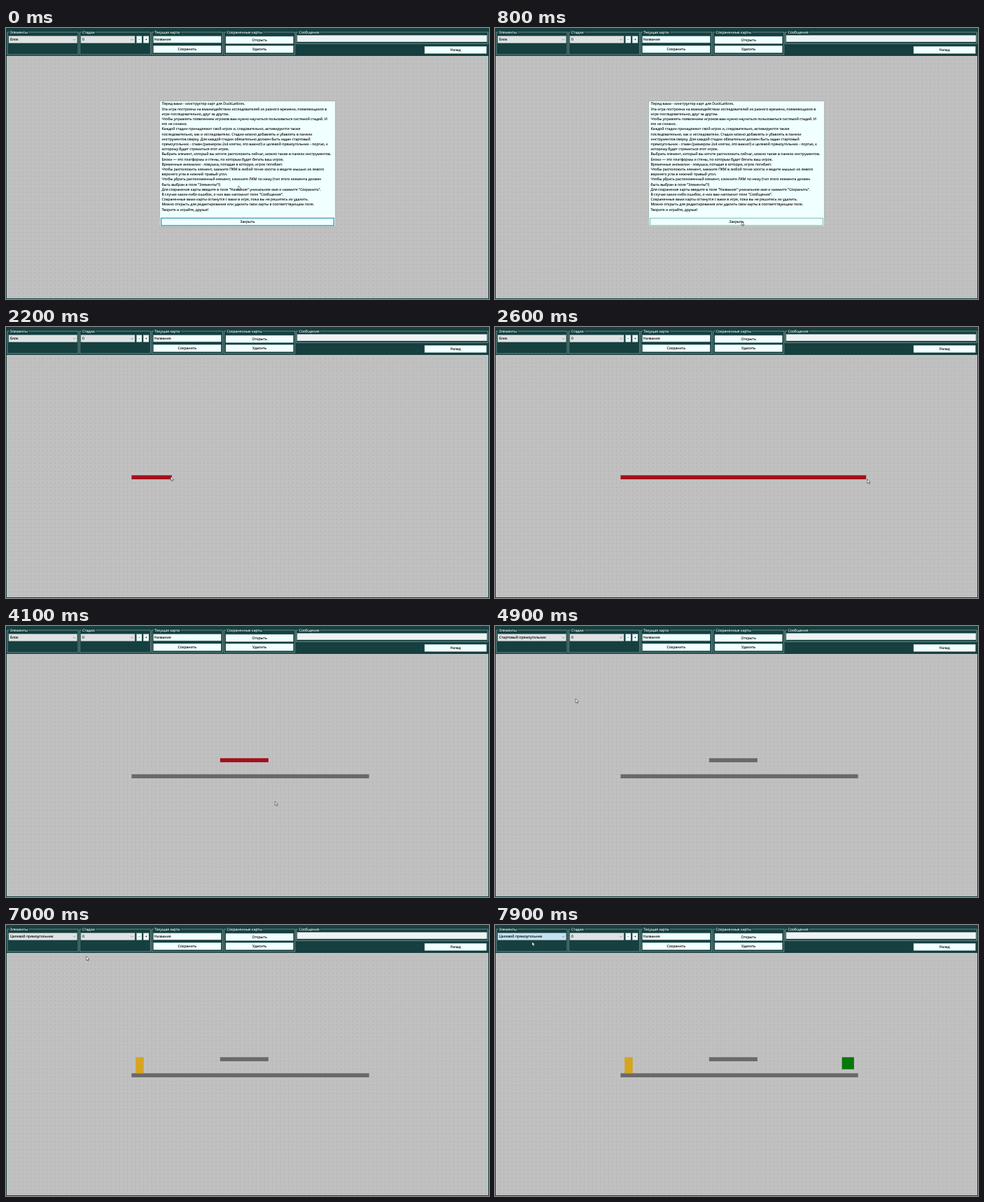
An HTML page for the animation above (8000 ms loop, 690 px wide and 388 px high).

```html
<!DOCTYPE html>
<html lang="ru">
<head>
<meta charset="utf-8">
<title>Конструктор карт</title>
<style>
html, body { margin: 0; width: 100%; height: 100%; overflow: hidden; background: #163f3f; }
svg { display: block; width: 690px; height: 388px; }
text { font: 5.1px "Open Sans", "Noto Sans", sans-serif; fill: #000; stroke: #000; stroke-width: 0.1px; text-rendering: geometricPrecision; white-space: pre; }
.mid { text-anchor: middle; }
.title { fill: #eef5f5; stroke: #eef5f5; }
</style>
</head>
<body>
<svg id="stage" viewBox="0 0 690 388"></svg>
<script>
const NS = "http://www.w3.org/2000/svg";
const stage = document.getElementById("stage");
const LOOP = 8000, STEP = 100;
const CELL = 5.75, X0 = 1.15, Y0 = 39.8;
const TEAL = "#163f3f", AZURE = "#f0ffff", RED = "#a3101a", GREY = "#696969", EDGE = "#93adad";

function add(tag, attrs, parent = stage) {
  const el = document.createElementNS(NS, tag);
  for (const k in attrs) el.setAttribute(k, attrs[k]);
  parent.appendChild(el);
  return el;
}
function box(x, y, w, h, fill, stroke = "none", sw = 0.5, parent = stage) {
  return add("rect", { x, y, width: w, height: h, fill, stroke, "stroke-width": sw }, parent);
}
// y is the middle of the line
function label(s, x, y, cls = "", parent = stage) {
  const el = add("text", { x, y: y + 1.8, class: cls }, parent);
  el.textContent = s;
  return el;
}
function button(s, x, y, w, h = 10.3, parent = stage) {
  const el = box(x, y, w, h, AZURE, EDGE, 0.4, parent);
  label(s, x + w / 2, y + h / 2, "mid", parent);
  return el;
}
function group(s, x, w, h = 32) {
  box(x, 6, w, h, "none", "#a9bcbc", 0.6);
  const gap = box(x + 2.6, 4, 0, 4, TEAL);
  gap.setAttribute("width", label(s, x + 3.8, 6, "title").getComputedTextLength() + 2.4);
}
function combo(s, x, w) {
  const face = box(x, 11.5, w, 10, "#dfe3e3", "#acb4b4");
  const text = label(s, x + 2, 16.5);
  add("path", { d: `M${x + w - 5.6} 15.8l1.6 1.6l1.6 -1.6`, fill: "none", stroke: "#5a6262", "stroke-width": 0.6 });
  return { face, text };
}

// canvas with its dotted grid
box(1, 40, 688, 347, "#c0c0c0");
let rows = "";
for (let y = Y0 + CELL; y < 387; y += CELL) rows += `M${X0 + CELL - 0.27} ${y.toFixed(2)}H688.5`;
add("path", { d: rows, stroke: "#5c5c5c", "stroke-width": 0.54, "stroke-dasharray": `0.54 ${CELL - 0.54}`, fill: "none" });

// toolbar: four equal groups and a wide one
["Элементы", "Стадии", "Текущая карта", "Сохраненные карты"].forEach((s, i) => group(s, 2 + i * 103.25, 101.1));
group("Сообщения", 414.7, 273.9, 16.3);
const kind = combo("Блок", 4, 97.5);
combo("0", 107, 77);
button("-", 186.5, 11.6, 7.5, 9.8);
button("+", 196.2, 11.6, 7.8, 9.8);
box(210.7, 11.7, 96.5, 9.4, AZURE, EDGE, 0.4);
label("Название", 211.8, 16.5);
button("Сохранить", 210.7, 25.2, 96.4);
const open = button("Открыть", 314, 12, 96.4);
button("Удалить", 314, 25.2, 96.4);
box(416, 10.5, 271, 9.4, "#eef4f4", "#a9b6b6");
button("Назад", 598, 26.3, 88.4);

// cell rectangles dragged out from a to b, coloured at done
const blocks = [
  { x: 31, y: 30, w: 59, h: 1, a: 2100, b: 2800, done: 2900, fill: GREY },
  { x: 53, y: 26, w: 12, h: 1, a: 3300, b: 3700, done: 4200, fill: GREY },
  { x: 32, y: 26, w: 2, h: 4, a: 5100, b: 5700, done: 6500, fill: "#d5a520" },
  { x: 86, y: 26, w: 3, h: 3, a: 7300, b: 7500, done: 7600, fill: "#087808" }
];
for (const b of blocks) b.el = add("rect", { x: X0 + b.x * CELL, y: Y0 + b.y * CELL });

// help window
const help = add("g", {});
box(219.6, 104.6, 250.9, 179.4, AZURE, "#93a79c", 0.6, help);
`Перед вами - конструктор карт для DuskLattices.
Эта игра построена на взаимодействии исследователей из разного времени, появляющихся в
игре последовательно, друг за другом.
Чтобы управлять появлением игроков вам нужно научиться пользоваться системой стадий. И
это не сложно.
Каждой стадии принадлежит свой игрок и, следовательно, активируются также
последовательно, как и исследователи. Стадии можно добавлять и убавлять в панели
инструментов сверху. Для каждой стадии обязательно должен быть задан стартовый
прямоугольник - спавн (размером 2x4 клетки, это важно!) и целевой прямоугольник - портал, к
которому будет стремиться этот игрок.
Выбрать элемент, который вы хотите расположить сейчас, можно также в панели инструментов.
Блоки — это платформы и стены, по которым будет бегать ваш игрок.
Временные аномалии - ловушка, попадая в которую, игрок погибает.
Чтобы расположить элемент, зажмите ПКМ в любой точке холста и ведите мышью из левого
верхнего угла в нижний правый угол.
Чтобы убрать расположенный элемент, кликните ЛКМ по нему (тип этого элемента должен
быть выбран в поле "Элементы"!)
Для сохранения карты введите в поле "Название" уникальное имя и нажмите "Сохранить".
В случае каких-либо ошибок, о них вам напомнит поле "Сообщения".
Сохраненные вами карты останутся с вами в игре, пока вы не решитесь их удалить.
Можно открыть для редактирования или удалить свои карты в соответствующем поле.
Творите и играйте, друзья!`.split("\n").forEach((s, i) => label(s, 222.5, 108.6 + i * 7.2, "", help));
const close = button("Закрыть", 221.6, 272.2, 246.8, 10.6, help);

const cursor = add("path", {
  d: "M0 0V5.8L1.4 4.6L2.3 6.6L3.3 6.2L2.4 4.2H4.2Z",
  fill: "#fff", stroke: "#222", "stroke-width": 0.55, "stroke-linejoin": "round"
});

// cursor stops: it eases from one to the next and rests between from and to
const stops = [];
const stop = (from, to, x, y) => stops.push({ from, to, x, y });
const pick = t => stop(t - 100, t, 44, 18);
stop(0, 100, 332, 226);
stop(800, 800, 352, 277);
stop(900, 900, 346, 130);
stop(1200, 1500, 330.5, 16.5);
pick(1800);
stop(2500, 2600, 532, 218);
stop(4100, 4100, 384.3, 251);
pick(4700);
stop(6100, 6500, 288, 249);
pick(6900);
stop(7600, 7600, 502, 242);
stop(7900, LOOP, 53, 24);
for (const { x, y, w, h, a, b } of blocks) {
  stop(a, a, X0 + x * CELL + 1, Y0 + y * CELL + 1);
  stop(b, b, X0 + (x + w) * CELL + 1, Y0 + (y + h) * CELL - 1);
}
stops.sort((p, q) => p.from - q.from);

function at(t) {
  const i = stops.findIndex(s => s.to >= t), q = stops[i];
  if (t >= q.from) return [q.x, q.y];
  const p = stops[i - 1];
  const u = (t - p.to) / (q.from - p.to), k = u * u * (3 - 2 * u);
  return [p.x + (q.x - p.x) * k, p.y + (q.y - p.y) * k];
}
const inside = (x, y, x1, y1, x2, y2) => x >= x1 && x <= x2 && y >= y1 && y <= y2;
const cells = (from, to, origin) => CELL * Math.max(1, Math.round((to - origin) / CELL) - from);

function draw(time) {
  const t = Math.floor(time % LOOP / STEP) * STEP;
  const [x, y] = at(t);
  cursor.setAttribute("transform", `translate(${x} ${y})`);

  help.style.display = t < 900 ? "" : "none";
  const over = inside(x, y, 221, 272, 469, 283);
  close.setAttribute("stroke", over ? "#4f9a9c" : "#2585ad");
  close.setAttribute("stroke-width", over ? 0.7 : 1.1);
  open.setAttribute("stroke", inside(x, y, 314, 12, 411, 23) ? "#48a8cc" : EDGE);

  kind.face.setAttribute("fill", inside(x, y, 4, 11, 102, 24.5) ? "#c5e2f3" : "#dfe3e3");
  kind.text.textContent = t < 4700 ? "Блок" : t < 6900 ? "Стартовый прямоугольник" : "Целевой прямоугольник";

  for (const b of blocks) {
    b.el.style.display = t < b.a ? "none" : "";
    if (t < b.a) continue;
    const [ex, ey] = at(Math.min(t, b.b));
    b.el.setAttribute("width", cells(b.x, ex, X0));
    b.el.setAttribute("height", cells(b.y, ey, Y0));
    b.el.setAttribute("fill", t < b.done ? RED : b.fill);
  }
}

const start = performance.now();
function tick() {
  draw(performance.now() - start);
  requestAnimationFrame(tick);
}
tick();
</script>
</body>
</html>
```
